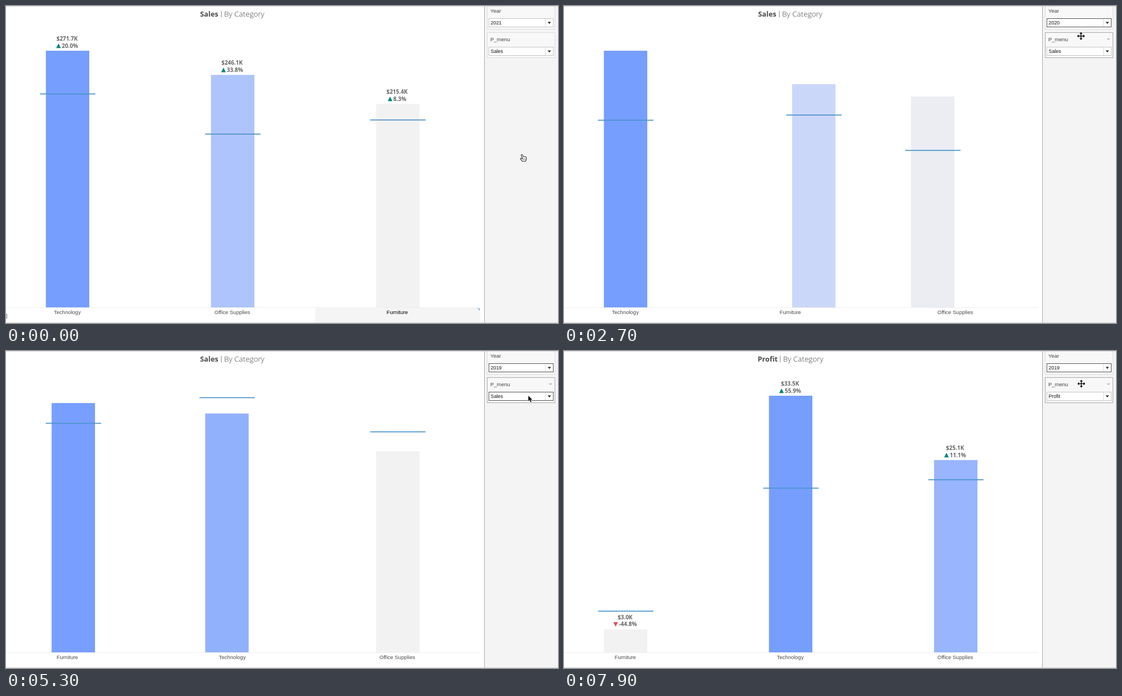
Write an HTML page with a canvas that moves like this. It is 987 px wide and 567 px high and loops after 8000 ms.

```html
<!DOCTYPE html>
<html lang="en">
<head>
<meta charset="utf-8">
<title>Sales by category</title>
<style>
html, body { margin: 0; width: 100%; height: 100%; overflow: hidden; background: #fff; }
canvas { display: block; }
</style>
</head>
<body>
<canvas id="stage" width="987" height="567"></canvas>
<script>
const g = document.getElementById('stage').getContext('2d');
const LOOP = 8000, BASE = 539, FULL = 459;
const ARIAL = '"Liberation Sans", Arial, sans-serif';
const OPEN = '"Open Sans", "Noto Sans", sans-serif';
const YEARS = ['2018', '2019', '2020', '2021'];
const MENU = ['Sales', 'Profit', 'Orders'];

// Thousands of dollars per year, from 2018 on
const data = {
  Sales: {
    Technology: [175.2, 162.8, 226.4, 271.7],
    'Office Supplies': [151.8, 137.2, 183.9, 246.1],
    Furniture: [157.19, 170.54, 198.9, 215.4]
  },
  Profit: {
    Technology: [21.49, 33.5],
    'Office Supplies': [22.59, 25.1],
    Furniture: [5.435, 3]
  }
};

// Labels switch at "lead"; the marks travel between "from" and "to"
const views = [
  { year: 3, measure: 'Sales', lead: 0, from: 0, to: 0 },
  { year: 2, measure: 'Sales', lead: 2400, from: 2600, to: 2900 },
  { year: 1, measure: 'Sales', lead: 4900, from: 5200, to: 5400 },
  { year: 1, measure: 'Profit', lead: 7000, from: 7300, to: 7600 }
];
const menus = [
  { y: 37.5, items: YEARS, pick: 2, open: 900, close: 2030 },
  { y: 37.5, items: YEARS, pick: 1, open: 3800, close: 4500 },
  { y: 88.5, items: MENU, pick: 1, open: 5800, close: 6775 }
];
// Pointer rests: arrive, leave, x, y
const rests = [
  [0, 0, 924, 266], [900, 1000, 930, 30], [1800, 2300, 930, 66],
  [2900, 3300, 922.5, 49.5], [3700, 3900, 928, 34], [4200, 4600, 928, 69],
  [5100, 5900, 934, 80], [6400, 7200, 927, 104], [7900, LOOP, 925, 58.5]
];

const mix = (a, b, p) => a + (b - a) * p;
const clamp = u => Math.min(1, Math.max(0, u));
const easeOut = (u, k) => 1 - Math.pow(1 - u, k);
const smooth = u => u * u * (3 - 2 * u);

function layout({ year, measure }) {
  const sales = data.Sales, rows = data[measure];
  const names = Object.keys(rows).sort((a, b) => sales[b][year] - sales[a][year]);
  const now = names.map(n => rows[n][year]), past = names.map(n => rows[n][year - 1]);
  const high = Math.max(...now), low = Math.min(...now);
  const scale = FULL / Math.max(high, ...past);
  const marks = {};
  names.forEach((name, slot) => {
    const p = (now[slot] - low) / (high - low);
    marks[name] = {
      slot,
      x: 110.1 + 295.2 * slot,
      top: BASE - now[slot] * scale,
      ref: BASE + .8 - past[slot] * scale,
      color: [mix(242, 118, p), mix(242, 158, p), mix(242, 255, Math.sqrt(p))],
      value: '$' + now[slot].toFixed(1) + 'K',
      change: ((now[slot] / past[slot] - 1) * 100).toFixed(1) + '%'
    };
  });
  return marks;
}
const layouts = views.map(layout);

function pointer(t) {
  const n = rests.findIndex(r => t <= r[1]);
  const b = rests[n], a = rests[Math.max(0, n - 1)];
  const p = t >= b[0] ? 1 : smooth((t - a[1]) / (b[0] - a[1]));
  return [mix(a[2], b[2], p), mix(a[3], b[3], p)];
}

const menuAlpha = (m, t) => clamp(Math.min((t - m.open) / 200, 1 - (t - m.close) / 140));

function text(s, x, y, font, color, align = 'left') {
  g.font = font;
  g.fillStyle = color;
  g.textAlign = align;
  g.fillText(s, x, y);
}

function rect(x, y, w, h, color) {
  g.fillStyle = color;
  g.fillRect(x, y, w, h);
}

function box(x, y, w, h, fill, stroke) {
  rect(x, y, w, h, fill);
  g.strokeStyle = stroke;
  g.lineWidth = 1;
  g.strokeRect(x, y, w, h);
}

function triangle(x, y, w, h, color) {
  g.beginPath();
  g.moveTo(x - w / 2, y);
  g.lineTo(x + w / 2, y);
  g.lineTo(x, y + h);
  g.fillStyle = color;
  g.fill();
}

function drawValue(cx, { top, value, change }) {
  const font = '700 10px ' + OPEN, grey = '#666';
  text(value, cx, top - 18, font, grey, 'center');
  const left = cx - (10 + g.measureText(change).width) / 2;
  if (change[0] === '-') triangle(left + 4.2, top - 13, 8.4, 8.2, '#e54d5a');
  else triangle(left + 4.2, top - 4.8, 8.4, -8.2, '#00857d');
  text(change, left + 10, top - 5.4, font, grey);
}

function drawChart(t, now) {
  const hovered = t < 100;
  rect(0, 539, 848, 1, '#eee');
  if (hovered) {
    rect(553, 540, 295, 26, '#f5f5f5');
    rect(843, 541, 4, 1, '#6fa3d8');
    rect(846, 541, 1, 4, '#6fa3d8');
    g.strokeStyle = '#777';
    g.lineWidth = 1;
    g.strokeRect(-3, 551.5, 4.5, 7);
  }

  const view = views[now], after = layouts[now], before = layouts[Math.max(0, now - 1)];
  const u = now ? clamp((t - view.from) / (view.to - view.from)) : 1;
  const px = easeOut(u, 4.85), py = easeOut(u, 5.6);
  const names = Object.keys(after);
  const marks = names.map(name => {
    const a = before[name], b = after[name];
    return {
      x: mix(a.x, b.x, px),
      top: mix(a.top, b.top, py),
      ref: mix(a.ref, b.ref, py),
      color: 'rgb(' + a.color.map((c, i) => Math.round(mix(c, b.color[i], py))) + ')'
    };
  });
  marks.forEach(m => rect(m.x - 38.8, m.top, 77.6, BASE - m.top, m.color));
  marks.forEach(m => rect(m.x - 49.2, m.ref - .85, 99, 1.7, '#4a92cc'));

  names.forEach(name => {
    const cx = 109.6 + 295 * after[name].slot;
    const dark = hovered && name === 'Furniture';
    text(name, cx, 550.5, '9.5px ' + ARIAL, dark ? '#000' : '#4b4b4b', 'center');
    if (u === 1) drawValue(cx - .4, after[name]);
  });

  const title = t < view.from ? views[now - 1].measure : view.measure;
  const shift = title === 'Profit' ? 1.7 : 0;
  text(title, 347 - shift / 2, 18.7, '700 12.8px ' + OPEN, '#4a4a4a');
  rect(384.6 + shift, 8.5, .9, 12, '#777');
  text('By Category', 390 + shift, 18.7, '300 13.5px ' + OPEN, '#444');
}

function drawCard(y, title, value, hover, focus) {
  box(860.5, y + .5, 121, 45, '#f8f8f8', hover ? '#aaa' : '#dcdcdc');
  text(title, 866, y + 15.6, '9.5px ' + ARIAL, '#444');
  if (hover) triangle(973.5, y + 11, 6, 3, '#b4b4b4');
  box(863.5, y + 26.5, 115, 15, '#fff', focus ? '#555' : '#c6c6c6');
  rect(964, y + 27, 1, 14, '#ddd');
  text(value, 866.6, y + 37.2, '8.8px ' + ARIAL, '#111');
  triangle(971.5, y + 32.4, 6, 3.5, '#222');
}

function drawMenu(menu, alpha, y) {
  if (!alpha) return;
  const lit = Math.min(menu.pick, Math.floor((y - menu.y) / 11));
  g.globalAlpha = alpha;
  box(863.5, menu.y, 115, menu.items.length * 11 + 1.5, '#fff', '#bbb');
  if (lit >= 0) rect(864, menu.y + .5 + lit * 11, 114, 11, '#ddd');
  menu.items.forEach((s, i) =>
    text(s, 866.8, menu.y + 9.3 + i * 11, '9.5px ' + ARIAL, '#333'));
  g.globalAlpha = 1;
}

const cursors = {
  arrow() {
    const shape = new Path2D('M0 0V9.8L2.2 7.7 3.9 11.4 5.5 10.7 3.9 7.1 6.9 6.9Z');
    g.strokeStyle = '#fff';
    g.lineWidth = 1.2;
    g.stroke(shape);
    g.fillStyle = '#000';
    g.fill(shape);
  },
  move() {
    for (const [color, width, reach] of [['#fff', 3, 6], ['#000', 1.4, 5]]) {
      rect(-reach, -width / 2, reach * 2, width, color);
      rect(-width / 2, -reach, width, reach * 2, color);
    }
    for (let i = 0; i < 4; i++) {
      triangle(0, -4, 5.4, -3, '#000');
      g.rotate(Math.PI / 2);
    }
  },
  hand() {
    const shape = new Path2D('M-1.6 1L1 6.5M-3 7.3L0 10.5M1.5 4.5L5 5 5.2 8 4.3 10.4H0L1 6Z');
    g.lineCap = g.lineJoin = 'round';
    for (const [color, width] of [['#222', 3.6], ['#fff', 1.6]]) {
      g.strokeStyle = g.fillStyle = color;
      g.lineWidth = width;
      g.stroke(shape);
      g.fill(shape);
    }
    for (let i = 0; i < 3; i++) rect(.8 + i * 1.6, 6.5, .7, 3, '#555');
  }
};

function draw(t) {
  const now = views.filter(v => t >= v.lead).length - 1;
  const view = views[now];
  rect(0, 0, 987, 567, '#fff');
  drawChart(t, now);
  rect(856, 0, 131, 567, '#f4f4f4');
  rect(855, 0, 1, 567, '#a8a8a8');

  const [x, y] = pointer(t);
  const alphas = menus.map(m => menuAlpha(m, t));
  const yearOpen = alphas[0] + alphas[1] > 0, open = yearOpen || alphas[2] > 0;
  const onYear = yearOpen || y < 42;
  const onMenu = !yearOpen && y >= 47 && y < 112;

  drawCard(-4, 'Year', YEARS[view.year], onYear, t >= 900);
  drawCard(47, 'P_menu', view.measure, onMenu, t >= 5000 && t < 7300);
  rect(0, 0, 987, 1, '#d2d2d2');
  rect(0, 566, 987, 1, '#d2d2d2');
  menus.forEach((m, i) => drawMenu(m, alphas[i], y));

  const kind = t < 100 ? 'hand' : !open && y > 42 && y < 72 ? 'move' : 'arrow';
  g.save();
  g.translate(x, y);
  cursors[kind]();
  g.restore();
}

// The screen refreshes ten times a second
function tick() {
  draw(Math.floor(performance.now() % LOOP / 100) * 100);
  requestAnimationFrame(tick);
}
tick();
</script>
</body>
</html>
```
